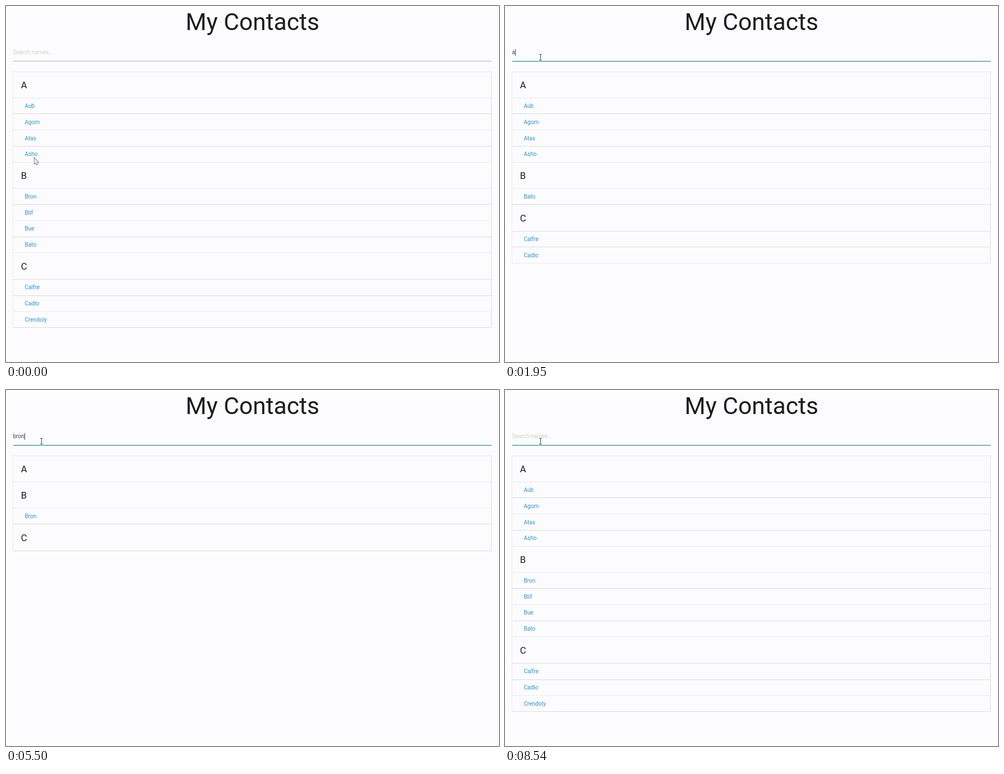
These frames come from a looping animation (881x636 px, 8.63 s). An HTML page with a canvas:

```html
<!DOCTYPE html>
<html lang="en">
<head>
<meta charset="utf-8">
<title>My Contacts</title>
<style>
  html, body { margin: 0; height: 100%; overflow: hidden; background: #fcfcfe; }
  canvas { display: block; }
</style>
</head>
<body>
<canvas id="stage" width="881" height="636"></canvas>
<script>
const ctx = document.getElementById('stage').getContext('2d');
const LOOP = 8630;
const LEFT = 13, RIGHT = 868, LIST_TOP = 117.4, ITEM_HEIGHT = 28.75;
const PALE = '#ececeb', SOLID = '#dcdcdc';

const groups = [
  { letter: 'A', height: 46.7, line: PALE, names: ['Aub', 'Agom', 'Atas', 'Asho'] },
  { letter: 'B', height: 46.7, line: PALE, names: ['Bron', 'Blif', 'Bue', 'Bato'] },
  { letter: 'C', height: 47.5, line: SOLID, names: ['Calfre', 'Cadlo', 'Crendoly'] }
];

// time, field text, list filter, field mode
const states = [
  [0, '', '', 'idle'],
  [1000, '', '', 'caret'],
  [1480, '', '', 'idle'],
  [1790, 'a', '', 'caret'],
  [1950, 'a', 'a', 'caret'],
  [2000, 'as', 'a', 'caret'],
  [2080, 'as', 'as', 'caret'],
  [2120, 'ash', 'as', 'caret'],
  [2170, 'ash', 'ash', 'caret'],
  [2210, 'asho', 'ash', 'caret'],
  [2290, 'asho', 'asho', 'caret'],
  [2790, 'asho', 'asho', 'idle'],
  [3080, 'asho', 'asho', 'selected'],
  [3750, 'b', 'asho', 'caret'],
  [3830, 'b', 'b', 'caret'],
  [4250, 'b', 'b', 'idle'],
  [4830, 'b', 'b', 'caret'],
  [5080, 'br', 'b', 'caret'],
  [5170, 'br', 'br', 'caret'],
  [5290, 'bro', 'br', 'caret'],
  [5420, 'bron', 'bro', 'caret'],
  [5500, 'bron', 'bron', 'caret'],
  [5950, 'bron', 'bron', 'selected'],
  [6370, 'k', 'bron', 'caret'],
  [6420, 'kc', 'k', 'caret'],
  [6470, 'kcj', 'kc', 'caret'],
  [6530, 'kcjd', 'kcj', 'caret'],
  [6580, 'kcjdsq', 'kcjdsq', 'caret'],
  [7120, 'kcjdsq', 'kcjdsq', 'idle'],
  [7540, 'kcjdsq', 'kcjdsq', 'selected'],
  [7950, '', 'kcjdsq', 'caret'],
  [8040, '', '', 'caret'],
  [8540, '', '', 'idle']
];

// time, x, y of the pointer tip
const pointerPath = [[40, 50, 271], [540, 69, 175], [870, 63, 91]];

const clamp01 = v => Math.max(0, Math.min(1, v));
const progress = (t, from, to) => clamp01((t - from) / (to - from));
const smooth = p => p * p * (3 - 2 * p);

function rect(x, y, w, h, color) {
  ctx.fillStyle = color;
  ctx.fillRect(x, y, w, h);
}

function text(str, x, y, size, color) {
  ctx.font = `${size}px Roboto, sans-serif`;
  ctx.fillStyle = color;
  ctx.fillText(str, x, y);
}

function drawField(t, value, mode) {
  const x = 12.4, baseline = 86;
  ctx.font = '10.15px Roboto, sans-serif';
  const width = ctx.measureText(value).width;
  if (mode === 'selected') rect(LEFT, 77, Math.round(width), 12, '#338ee2');
  if (value) text(value, x, baseline, 10.15, mode === 'selected' ? '#fff' : '#484848');
  else text('Search names...', x, baseline, 10.15, '#d0d0c8');
  if (mode === 'caret') rect(Math.floor(x + width + 0.4), 77, 1, 12, '#444');

  rect(LEFT, 98, RIGHT - LEFT, 1, '#b2b2b2');
  ctx.globalAlpha = progress(t, 950, 1250);
  rect(LEFT, 98, RIGHT - LEFT, 1, '#55a29a');
  rect(LEFT, 99, RIGHT - LEFT, 1, '#a4cbc7');
  ctx.globalAlpha = 1;
}

function drawList(filter) {
  let y = LIST_TOP;
  const line = color => rect(LEFT, Math.floor(y), RIGHT - LEFT, 1, color);
  line(PALE);
  for (const group of groups) {
    text(group.letter, 26.8, Math.round(y + 30), 16.65, '#1c1c18');
    y += group.height;
    line(group.line);
    group.names
      .filter(name => name.toLowerCase().includes(filter))
      .forEach((name, i) => {
        text(name, 33.4, Math.round(y + 18), 10.15, '#3093c6');
        y += ITEM_HEIGHT;
        line(i % 2 ? PALE : SOLID);
      });
  }
  const height = Math.floor(y) - 117;
  rect(12, 117, 1, height, PALE);
  rect(RIGHT - 1, 117, 1, height, SOLID);
}

function drawArrow(x, y) {
  ctx.save();
  ctx.translate(x + 0.5, y + 0.5);
  ctx.stroke(new Path2D('M0 0V10.5L2.4 8.3L4 12.2L5.7 11.5L4.1 7.7H7.4Z'));
  ctx.fillStyle = '#fff';
  ctx.fill(new Path2D('M0 0V10.5L2.4 8.3L4 12.2L5.7 11.5L4.1 7.7H7.4Z'));
  ctx.restore();
}

function drawBeam(x, y) {
  rect(x - 0.5, y - 5, 1, 11, '#444');
  rect(x - 2.5, y - 5, 5, 1, '#555');
  rect(x - 2.5, y + 5, 5, 1, '#555');
}

function drawPointer(t) {
  let [, x, y] = pointerPath[0];
  for (let i = 1; i < pointerPath.length; i++) {
    const [t0, x0, y0] = pointerPath[i - 1], [t1, x1, y1] = pointerPath[i];
    if (t < t0) break;
    const p = smooth(progress(t, t0, t1));
    x = x0 + (x1 - x0) * p;
    y = y0 + (y1 - y0) * p;
  }
  ctx.strokeStyle = '#333';
  ctx.lineWidth = 1.2;
  if (y > 98) drawArrow(Math.round(x), Math.round(y));
  else drawBeam(Math.round(x) + 0.5, Math.round(y));
}

function draw(t) {
  const [, value, filter, mode] = states.findLast(state => state[0] <= t);
  rect(0, 0, 881, 636, '#fcfcfe');
  ctx.textAlign = 'center';
  text('My Contacts', 440.5, 43, 42.6, '#1c1c1c');
  ctx.textAlign = 'left';
  drawField(t, value, mode);
  drawList(filter);

  // Link status bar fades in and out while the pointer crosses the names.
  ctx.globalAlpha = progress(t, 120, 220) * (1 - progress(t, 480, 720));
  rect(0, 622, 226, 14, '#eeeee3');
  ctx.globalAlpha = 1;

  drawPointer(t);
}

const start = performance.now();
function frame() {
  draw((performance.now() - start) % LOOP);
  requestAnimationFrame(frame);
}
frame();
</script>
</body>
</html>
```
